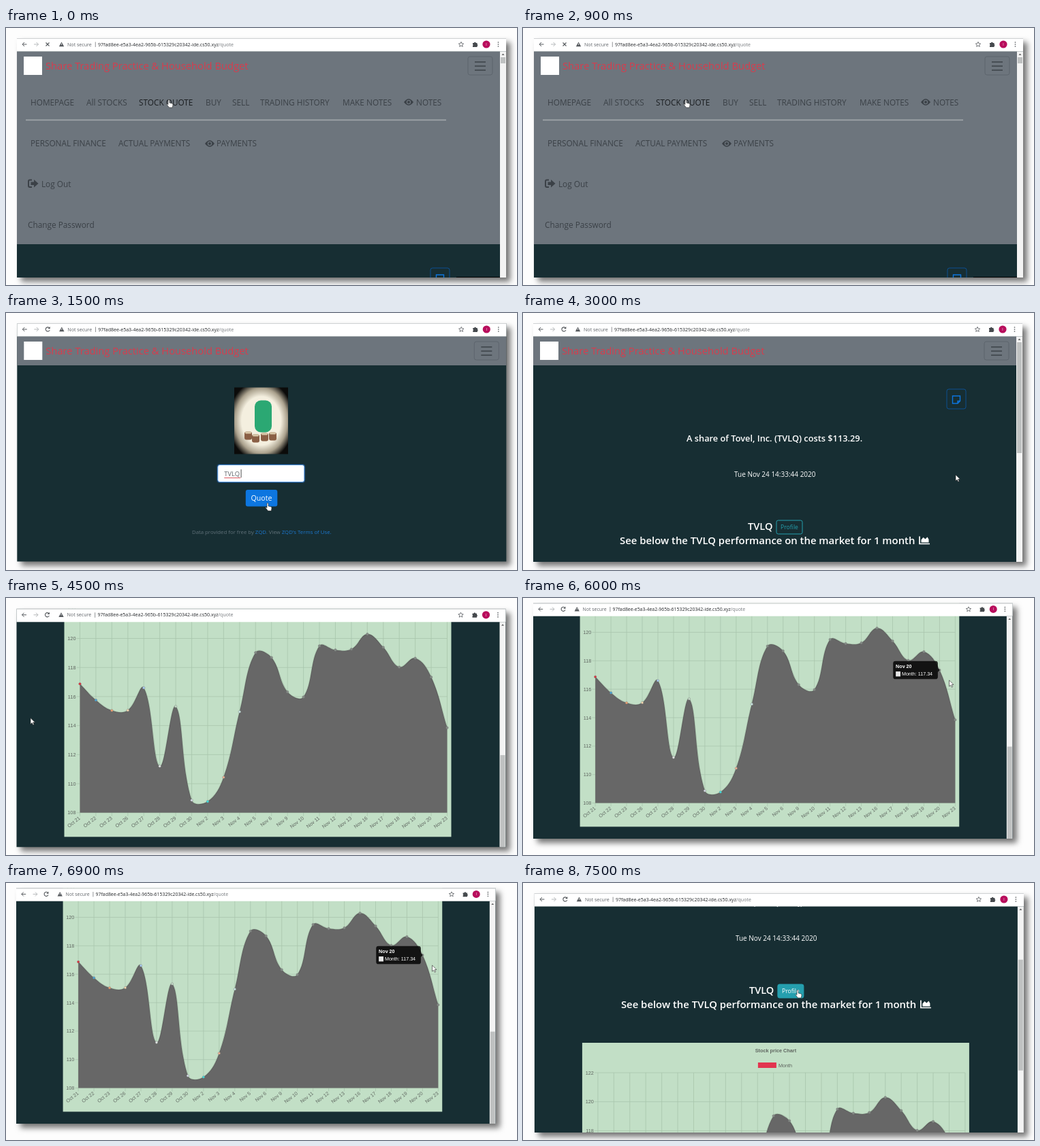
These frames come from a looping animation (750 by 378 pixels, 8 s). An HTML page:

```html
<!DOCTYPE html>
<html lang="en">
<head>
<meta charset="utf-8">
<title>Share quote walkthrough</title>
<style>
  html, body { margin: 0; width: 100%; height: 100%; overflow: hidden; background: #fdfdfd; }
  #stage { display: block; width: 750px; height: 378px; }
  text { font-family: "Open Sans", "Noto Sans", sans-serif; white-space: pre; }
  .chart text, .tip text { font-family: "Liberation Sans", Arial, sans-serif; font-size: 7.3px; }
  .chart text { fill: #5f6660; }
  .tip text { fill: #fff; }
  .frame { filter: drop-shadow(6px 6px 4px rgba(0, 0, 0, .55)); }
  .bold { font-weight: 600; }
</style>
</head>
<body>
<svg id="stage" viewBox="0 0 750 378"></svg>
<script>
const LOOP = 8000, STEP = 1500;
const WIDTH = 718, PAGE = 709, BAR = 19.5, HEADER = 62;
const DARK = '#172e33', GREY = '#6d757d', INK = '#3b4147', BLUE = '#0d76e0';
const TICKER = 'TVLQ';

const rect = (x, y, w, h, fill, more = '') =>
  `<rect x="${x}" y="${y}" width="${w}" height="${h}" fill="${fill}" ${more}/>`;
const text = (x, y, size, fill, body, more = '') =>
  `<text x="${x}" y="${y}" font-size="${size}" fill="${fill}" ${more}>${body}</text>`;
const line = (d, stroke, width = 1) =>
  `<path d="${d}" fill="none" stroke="${stroke}" stroke-width="${width}"/>`;
const shape = (d, fill, more = '') => `<path d="${d}" fill="${fill}" ${more}/>`;
const dot = (x, y, r, fill, more = '') =>
  `<circle cx="${x}" cy="${y}" r="${r}" fill="${fill}" ${more}/>`;
const at = (x, y, body) => `<g transform="translate(${x} ${y})">${body}</g>`;
const CENTER = 'text-anchor="middle"';

function toolbar(loading) {
  const icon = '#55595d';
  const reload = loading
    ? line('M42.5 6.5l5 5m0-5l-5 5', icon, 1.1)
    : line('M47.6 7.2a3.1 3.1 0 1 0 .3 2.9', icon, 1.1) + shape('M48.4 5v3.3h-3.3z', icon);
  return rect(-1, -1, WIDTH + 2, BAR + 1, '#fff') + rect(0, 0, WIDTH, 1, '#cfd1d3')
    + line('M14.5 9H8m3-3L8 9l3 3', icon)
    + line('M25 9h6.5m-3-3l3 3l-3 3', '#b5b8ba')
    + reload
    + shape('M65.5 5.5l3.7 6.7h-7.4z', icon) + rect(65.1, 7.6, .8, 2.3, '#fff')
    + text(74, 11.7, 7.1, '#5f6368', 'Not secure')
    + rect(114.8, 5.5, .8, 7.5, '#77797c')
    + text(119, 11.7, 7.05, '#25282b',
        '97fad8ee-e5a3-4ea2-965b-615329c20342-ide.cs50.xyz<tspan fill="#75797d">/quote</tspan>')
    + line('M652 5.4l1.1 2.4l2.6 .3l-2 1.7l.6 2.6l-2.3-1.4l-2.3 1.4l.6-2.6l-2-1.7l2.6-.3z', icon, .8)
    + shape('M669 7h2a1.3 1.3 0 0 1 2.6 0h2v2a1.3 1.3 0 0 1 0 2.4v1.6h-6.6v-2a1.2 1.2 0 0 0 0-2z', '#45494d')
    + dot(689, 9, 5.6, '#b80d5c') + text(689, 11, 5, '#fff', 'I', CENTER)
    + [6, 9, 12].map(y => dot(706.5, y, .85, icon)).join('');
}

function scrollbar(scroll, thumb = 163) {
  return rect(PAGE, BAR, WIDTH - PAGE, 340, '#f3f3f3')
    + rect(PAGE + 1, 28 + scroll * .447, 7, thumb, '#bfc1c1')
    + shape('M711.5 25l2-2.5l2 2.5z', '#666');
}

function header(height, width) {
  const menuX = width - 47;
  return rect(0, BAR, width, height - BAR, GREY)
    + rect(10, 27, 27, 27, '#fff')
    + text(42, 45.5, 14.7, '#d83c4d', 'Share Trading Practice &amp; Household Budget')
    + rect(menuX, 27, 36, 27, 'none', 'rx="3" stroke="#5d656d"')
    + line(`M${menuX + 10} 35h16m-16 6h16m-16 6h16`, INK, 1.4);
}

const eye = (x, y) => at(x, y,
  shape('M0 0q7-9.5 14 0q-7 9.5-14 0z', INK) + dot(7, 0, 3.2, GREY) + dot(7, 0, 2, INK));

function navigation() {
  const item = (x, y, label, fill = INK) => text(x, y, 11.8, fill, label);
  const rows = [
    [98.5, [[20, 'HOMEPAGE'], [102, 'All STOCKS'], [277, 'BUY'], [316, 'SELL'],
            [357, 'TRADING HISTORY'], [478, 'MAKE NOTES'], [586, 'NOTES']]],
    [159, [[20, 'PERSONAL FINANCE'], [149, 'ACTUAL PAYMENTS'], [293, 'PAYMENTS']]],
    [219, [[36, 'Log Out']]],
    [279, [[16, 'Change Password']]],
  ];
  return rows.map(([y, items]) => items.map(([x, label]) => item(x, y, label)).join('')).join('')
    + item(179, 98.5, 'STOCK QUOTE', '#1b1e21')
    + rect(13, 119.5, 617, 1.7, '#a0a5aa')
    + eye(568, 94) + eye(276, 155)
    + line('M22 208.5h-3q-2 0-2 2v6.5q0 2 2 2h3', INK, 2)
    + shape('M20.5 211.5h4.500v-3.5l6.5 5.7l-6.5 5.7v-3.5h-4.5z', INK);
}

const values = [116.87, 115.75, 115.04, 115.05, 116.6, 111.2, 115.32, 108.86, 108.77, 110.44, 114.95, 119.03,
  118.69, 116.32, 115.97, 119.49, 119.21, 119.26, 120.3, 119.39, 118.03, 118.64, 117.34, 113.85];
const days = [...[21, 22, 23, 26, 27, 28, 29, 30].map(d => 'Oct ' + d),
  ...[2, 3, 4, 5, 6, 9, 10, 11, 12, 13, 16, 17, 18, 19, 20, 23].map(d => 'Nov ' + d)];
const pointColors = ['#e0303c', '#48a5d8', '#f0a070', '#f5d9b0', '#a9cdf5', '#e3e8e6', '#c5dcc9', '#d5dbe6',
  '#3fe0e0', '#f0b294', '#c9e6e2'];
const plot = { left: 23, right: 562, top: 44, bottom: 343 };
const px = i => plot.left + i * (plot.right - plot.left) / (values.length - 1);
const py = v => plot.top + (122 - v) * (plot.bottom - plot.top) / 14;

// Cardinal spline whose handles are weighted by the distance to each neighbour.
function spline(points, tension = .4) {
  const handles = points.map(([x, y], i) => {
    const a = points[i - 1] || points[i], b = points[i + 1] || points[i];
    const da = Math.hypot(x - a[0], y - a[1]), db = Math.hypot(b[0] - x, b[1] - y);
    const along = k => [x + k * (b[0] - a[0]), y + k * (b[1] - a[1])];
    return [along(-tension * da / (da + db)), along(tension * db / (da + db))];
  });
  return 'M' + points[0] + points.slice(1)
    .map((p, i) => `C${handles[i][1]} ${handles[i + 1][0]} ${p}`).join('');
}

function chart() {
  const { left, right, top, bottom } = plot;
  const points = values.map((v, i) => [px(i), py(v)]);
  const curve = spline(points), grid = '#a9c6ad';
  let out = rect(0, 0, 568, 378.5, '#c2dfc6');
  out += `<text x="284" y="13.5" font-weight="bold" ${CENTER}>Stock price Chart</text>`
    + rect(258, 29, 27, 8, '#e2344f') + '<text x="288" y="35.6">Month</text>';
  for (let v = 108; v <= 122; v += 2) {
    out += line(`M${left - 5} ${py(v)}H${right}`, grid, .8)
      + `<text x="${left - 6}" y="${py(v) + 2.6}" text-anchor="end">${v}</text>`;
  }
  days.forEach((day, i) => {
    out += line(`M${px(i)} ${top}V${bottom + 5}`, grid, .8)
      + `<text transform="translate(${px(i) + 1} ${bottom + 9}) rotate(-38)" text-anchor="end">${day}</text>`;
  });
  out += shape(`${curve}V${bottom}H${left}z`, '#676767') + line(curve, 'rgba(0,0,0,.14)', 1.6);
  points.forEach(([x, y], i) => {
    out += dot(x, y, 1.8, pointColors[i] || '#858d87', 'stroke="#777" stroke-width=".4"');
  });
  return `<g class="chart">${out}</g>`;
}

function tooltip() {
  const fill = 'rgba(0,0,0,.82)';
  return `<g class="tip">${rect(539, 87, 67, 27, fill, 'rx="3.5"')}${shape('M606 97.5l3 3l-3 3z', fill)}
    <text x="543" y="97" font-weight="bold">Nov 20</text>
    ${rect(543, 102.5, 7, 7.5, '#e6e6e6')}<text x="552" y="109">Month: 117.34</text></g>`;
}

function noteButton(y) {
  return rect(607, y, 28, 29, 'none', 'rx="3" stroke="#0c4f91"')
    + line(`M615.5 ${y + 10}h11v7.5l-3.5 3.5h-7.5zm11 7.5h-3.5v3.5`, BLUE, 1.4);
}

function resultPage(scroll, hovered) {
  const teal = '#259fae';
  return at(0, -scroll,
      header(HEADER, PAGE)
      + noteButton(97)
      + text(225, 174, 12.8, '#fff', `A share of Tovel, Inc. (${TICKER}) costs $113.29.`, 'class="bold"')
      + text(295, 226, 10, '#fff', 'Tue Nov 24 14:33:44 2020')
      + text(315, 303.5, 14.6, '#fff', TICKER, 'class="bold"')
      + rect(357, 290, 38, 20, hovered ? teal : 'none', `rx="2.5" stroke="${teal}"`)
      + text(376, 303.3, 8.6, hovered ? '#fff' : teal, 'Profile', CENTER)
      + text(127, 325, 14.9, '#fff', `See below the ${TICKER} performance on the market for 1 month`, 'class="bold"')
      + line('M567 313.5v11h15', '#fff', 1.7)
      + shape('M569.5 322.5v-4l3-3.5l3 2.5l3-3l2 3.5v4.5z', '#fff')
      + at(70, 376, chart()))
    + scrollbar(scroll);
}

function menuPage() {
  const height = 303;
  return header(height, PAGE) + navigation() + noteButton(height + 35)
    + scrollbar(0, 9) + rect(645, 351, 64, 1, '#000');
}

function quotePage() {
  const link = body => `<tspan fill="#1c78cf">${body}</tspan>`;
  const photo = rect(0, 0, 79, 98, 'url(#vignette)')
    + rect(30, 19, 25, 47, '#2ba873', 'rx="9"')
    + [[15, 65], [26, 69], [39, 67], [51, 66]].map(([x, y]) =>
        rect(x, y, 11, 12, '#8a5f45', 'rx="3"') + rect(x + 1, y, 9, 3, '#d8c7a8', 'rx="1.5"')).join('');
  return header(HEADER, WIDTH)
    + at(318.7, 94.5, photo)
    + rect(293, 207, 130, 28, '#173f63', 'rx="4"')
    + rect(294.5, 208.5, 127, 25, '#fff', 'rx="3" stroke="#5b9be0"')
    + text(304, 225, 9.4, '#5d6269', TICKER)
    + line('M304 227.5h24', '#d64550', .9)
    + line('M328.8 215v12', '#222', .8)
    + rect(335.5, 245, 46.5, 24.5, BLUE, 'rx="3"')
    + text(358.7, 260.7, 10.6, '#fff', 'Quote', CENTER)
    + text(359, 309.6, 7.8, '#61727a',
        `Data provided for free by ${link('ZQD')}. View ${link("ZQD's Terms of Use.")}`, CENTER);
}

const outline = 'stroke="#222" stroke-width=".6"';
const arrow = (x, y) => at(x, y,
  shape('M0 0v9l2.2-1.9l1.5 3.2l1.5-.7l-1.5-3.1h2.9z', '#fff', outline));
const hand = (x, y) => at(x, y,
  shape('M-1 1q1-1.5 2 0v4l4 1q1.3 .5 1 2l-.7 4h-4.800l-3.5-4.5q.5-1.6 2 0z', '#fff', outline));

// Window origin, scale and height in window units, then the page and the pointer.
const scenes = [
  { x: 16, y: 15, h: 352, page: menuPage(), pointer: hand(239, 105), loading: true },
  { x: 16.3, y: 15, h: 350.5, page: quotePage(), pointer: hand(384, 279) },
  { x: 15, y: 15, h: 351, page: resultPage(0), pointer: arrow(635, 238) },
  { x: 15.5, y: 15.8, h: 350.5, page: resultPage(419), pointer: arrow(36, 176.5) },
  { x: 15, y: 7.6, scale: .98, h: 353.5, page: resultPage(419) + tooltip(), pointer: arrow(625.5, 121) },
  { x: 16.9, y: 15, h: 352, page: resultPage(156, true), pointer: hand(403, 157) },
];

const stage = document.getElementById('stage');
stage.innerHTML = `<defs><radialGradient id="vignette" r=".66">
    <stop offset=".55" stop-color="#f4efdf"/><stop offset=".74" stop-color="#aaa18d"/>
    <stop offset=".92" stop-color="#0b0b0a"/></radialGradient></defs>`
  + scenes.map(({ x, y, scale = 1, h, page, pointer, loading }) => {
    const box = `x="${x}" y="${y}" width="${WIDTH * scale}" height="${h * scale}"`;
    return `<g class="scene"><rect class="frame" ${box} fill="${DARK}"/>
      <svg ${box} viewBox="0 0 ${WIDTH} ${h}" overflow="hidden">${page}${toolbar(loading)}</svg>${pointer}</g>`;
  }).join('');

// Each scene is opaque during its own step and hidden during the others.
stage.querySelectorAll('.scene').forEach((scene, i) => {
  const steps = scenes.map((_, j) => ({ opacity: +(i === j), offset: j * STEP / LOOP, easing: 'step-end' }));
  scene.animate([...steps, { opacity: 0, offset: 1 }], { duration: LOOP, iterations: Infinity });
});
</script>
</body>
</html>
```
